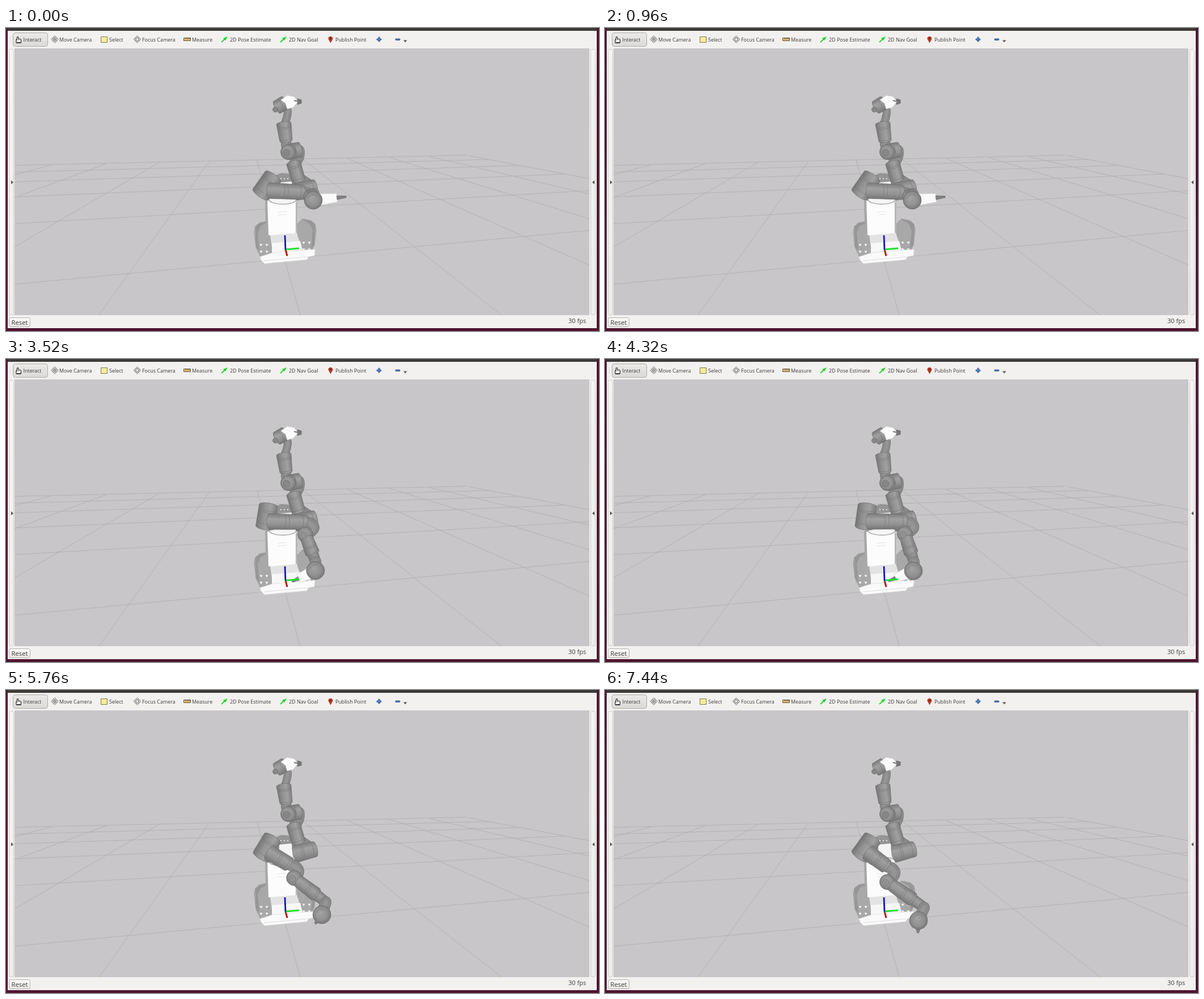
These frames come from a looping animation (1046x535 px, 8 s). An HTML page with a canvas:

```html
<!DOCTYPE html>
<html lang="en">
<head>
<meta charset="utf-8">
<title>Robot viewer</title>
<style>
html, body { margin: 0; width: 100%; height: 100%; overflow: hidden; background: #f2f1f0; }
canvas { display: block; }
</style>
</head>
<body>
<canvas id="stage" width="1046" height="535"></canvas>
<script>
const c = document.getElementById('stage').getContext('2d');
const FONT = '"Open Sans", "Noto Sans", sans-serif';
const LOOP = 8000;
const EDGE = '#717071';

// ---------- drawing helpers ----------
const lerp = (a, b, t) => a + (b - a) * t;
const between = (p, q, t) => [lerp(p[0], q[0], t), lerp(p[1], q[1], t)];

function rect(x, y, w, h, fill) {
  c.fillStyle = fill;
  c.fillRect(x, y, w, h);
}

function paint(fill, edge, width = 0.8) {
  if (fill) {
    c.fillStyle = fill;
    c.fill();
  }
  if (edge) {
    c.strokeStyle = edge;
    c.lineWidth = width;
    c.stroke();
  }
}

function poly(pts, fill, edge) {
  c.beginPath();
  for (let i = 0; i < pts.length; i += 2) c.lineTo(pts[i], pts[i + 1]);
  c.closePath();
  paint(fill, edge);
}

function line(x1, y1, x2, y2, color, width = 1) {
  c.beginPath();
  c.moveTo(x1, y1);
  c.lineTo(x2, y2);
  paint(null, color, width);
}

function disc(x, y, r, fill, edge) {
  c.beginPath();
  c.arc(x, y, r, 0, 7);
  paint(fill, edge);
}

function box(x, y, w, h, r, top, bottom, edge) {
  const g = c.createLinearGradient(0, y, 0, y + h);
  g.addColorStop(0, top);
  g.addColorStop(1, bottom);
  c.beginPath();
  c.roundRect(x + 0.5, y + 0.5, w - 1, h - 1, r);
  paint(g, edge, 1);
}

function text(str, x, y, size) {
  c.font = size + 'px ' + FONT;
  c.fillStyle = '#3c3c3c';
  c.fillText(str, x, y);
}

// Shaded cylinder from p to q, with seams at the given fractions.
function tube(p, r1, q, r2, seams = [0.14, 0.86]) {
  const dx = q[0] - p[0], dy = q[1] - p[1], len = Math.hypot(dx, dy);
  const r = Math.max(r1, r2), bulge = 0.3;
  c.save();
  c.translate(...p);
  c.rotate(Math.atan2(dy, dx));
  const g = c.createLinearGradient(0, -r, 0, r);
  g.addColorStop(0, '#7c7b7c');
  g.addColorStop(0.35, '#a1a0a1');
  g.addColorStop(0.65, '#949394');
  g.addColorStop(1, '#767576');
  c.beginPath();
  c.ellipse(0, 0, r1 * bulge, r1, 0, Math.PI / 2, Math.PI * 1.5);
  c.ellipse(len, 0, r2 * bulge, r2, 0, -Math.PI / 2, Math.PI / 2);
  c.closePath();
  paint(g, EDGE, 0.7);
  for (const s of seams) {
    const k = lerp(r1, r2, s);
    c.beginPath();
    c.ellipse(len * s, 0, k * bulge, k, 0, -Math.PI / 2, Math.PI / 2);
    paint(null, '#7a797a', 0.7);
  }
  c.restore();
}

function ball(p, r) {
  const g = c.createRadialGradient(p[0] - r * 0.2, p[1] - r * 0.25, 1, p[0], p[1], r * 1.1);
  g.addColorStop(0, '#a3a2a3');
  g.addColorStop(0.6, '#929192');
  g.addColorStop(1, '#737273');
  disc(...p, r, g, EDGE);
}

// Curved connector that bows through a control point.
function strap(p, bow, q, width) {
  c.lineCap = 'round';
  for (const [color, w] of [[EDGE, width], ['#8b8a8b', width - 1.4], ['#969596', width * 0.4]]) {
    c.beginPath();
    c.moveTo(...p);
    c.quadraticCurveTo(...bow, ...q);
    paint(null, color, w);
  }
  c.lineCap = 'butt';
}

function taper(p, r1, q, r2, fill, edge) {
  const a = Math.atan2(q[1] - p[1], q[0] - p[0]) + Math.PI / 2;
  const u = Math.cos(a), v = Math.sin(a);
  poly([p[0] + u * r1, p[1] + v * r1, q[0] + u * r2, q[1] + v * r2,
        q[0] - u * r2, q[1] - v * r2, p[0] - u * r1, p[1] - v * r1], fill, edge);
}

// ---------- window ----------
function drawWindow() {
  rect(0, 0, 1046, 535, '#4f1430');
  rect(3, 0, 1039, 5, '#3d3b37');
  rect(3, 5, 1039, 525, '#f2f1f0');
  rect(15, 36, 1014, 471, '#c8c6c8');
  for (const x of [5, 1031]) box(x, 37, 9, 470, 3, '#f5f4f3', '#eeedeb', '#cfccc9');
  poly([9, 269, 13, 272.5, 9, 276], '#565450');
  poly([1038, 269, 1034, 272.5, 1038, 276], '#565450');
  box(5, 511, 38, 17, 3, '#fbfbfa', '#e9e7e5', '#b4b0ab');
  text('Reset', 9.5, 524, 11.3);
  text('30 fps', 992, 521, 11);
}

// ---------- toolbar ----------
function hand(x) {
  c.beginPath();
  c.roundRect(x + 1, 19.5, 8.5, 7, 2);
  c.roundRect(x + 2.5, 15.5, 2.4, 6, 1);
  paint('#fff', '#222', 1.2);
  rect(x + 2.8, 19, 1.8, 5, '#fff');
  rect(x + 2.5, 25, 6, 1.8, '#333');
}

function cross(x, hub) {
  for (let i = 0; i < 4; i++) {
    c.save();
    c.translate(x + 6.5, 20);
    c.rotate(i * Math.PI / 2);
    poly([0, -6.5, 3, -3.5, 1, -3.5, 1, -1, -1, -1, -1, -3.5, -3, -3.5], '#dad9d7', '#777674');
    c.restore();
  }
  disc(x + 6.5, 20, hub, '#e9e8e6', '#777');
}

function marquee(x) {
  rect(x, 15, 12, 11, '#f6eb9c');
  c.setLineDash([2, 1]);
  c.strokeStyle = '#44422f';
  c.lineWidth = 1;
  c.strokeRect(x + 0.5, 15.5, 11, 10);
  c.setLineDash([]);
}

function ruler(x) {
  box(x, 17, 13, 6, 0, '#e6cc94', '#c9a867', '#6e5a3a');
  for (let i = 3; i < 12; i += 2) rect(x + i, 17, 0.8, 2.5, '#54452c');
}

function arrow(x) {
  line(x, 25, x + 7, 18.5, '#22d52a', 1.8);
  poly([x + 3, 18, x + 11, 15, x + 7, 22], '#22d52a');
}

function pin(x) {
  c.beginPath();
  c.arc(x + 4, 18.7, 3.9, Math.PI * 0.9, Math.PI * 2.1);
  c.lineTo(x + 4, 26.5);
  paint('#b93a24');
  disc(x + 4, 18.5, 1.4, '#6d1c14');
}

const tools = [
  ['Interact', 17, 30.5, hand],
  ['Move Camera', 79.5, 94, x => cross(x, 1.2)],
  ['Select', 167, 182, marquee],
  ['Focus Camera', 225, 240, x => cross(x, 2.6)],
  ['Measure', 313, 328, ruler],
  ['2D Pose Estimate', 380, 395, arrow],
  ['2D Nav Goal', 484, 499, arrow],
  ['Publish Point', 568.5, 581, pin]
];

function drawToolbar() {
  box(12, 8, 62, 25, 4, '#ebeae8', '#dcdad8', '#aeaaa6');
  for (let y = 15; y < 27; y += 3) rect(7, y, 1, 1, '#c3c0bc');
  for (const [label, iconX, x, icon] of tools) {
    icon(iconX);
    text(label, x, 23.8, 8.95);
  }
  const blue = ['#6b94c9', '#3d6ba8', '#31598f'];
  for (const x of [653.5, 686.5]) box(x, 18.5, 9, 3.4, 0.8, ...blue);
  box(656.4, 15.5, 3.4, 9, 0.8, ...blue);
  rect(655, 19.2, 6.4, 2, '#5582bb');
  poly([701, 21.5, 707.5, 21.5, 704.2, 25.5], '#5d5b58');
}

// ---------- ground grid in perspective ----------
function drawGrid() {
  const color = '#b2b0b2';
  const farX = n => (443 + 92.5 * n) / (1 + 0.0222 * n);
  const farY = x => 243 - 0.0222 * (x - 16);
  const nearX = n => 519 + 355 * n;
  c.save();
  c.beginPath();
  c.rect(15, 37, 1014, 470);
  c.clip();
  for (let n = -4; n <= 5; n++) line(farX(n), farY(farX(n)), nearX(n), 507, color, 0.9);

  // Rows share a vanishing point and stop at the right border.
  const x5 = farX(5), y5 = farY(x5), border = (507 - y5) / (nearX(5) - x5);
  for (let n = 0; n <= 5; n++) {
    const y = 176 + 438 / (1.585 + n), slope = (176 - y) / 2944;
    const end = (y - 16 * slope - y5 + border * x5) / (border - slope);
    line(16, y, end, y + slope * (end - 16), color, 0.9);
  }
  c.restore();
}

// ---------- robot ----------
function drawFender() {
  poly([438, 360, 440, 350, 447, 344, 462, 341, 471, 350, 469, 398, 449, 404, 441, 387], '#a9a8a9', '#949394');
  poly([440, 351, 447, 345, 463, 342, 449, 350, 444, 362, 447, 395, 441, 386], '#979697');
  for (const x of [450, 460]) {
    for (const y of [383, 395]) poly([x - 2.5, y - 1.5, x + 2.5, y - 1.5, x, y + 2.5], '#fff');
  }
}

function drawBase() {
  poly([470, 268, 477, 260, 486, 257, 499, 258, 506, 272, 500, 304, 468, 300], '#969596', '#807f80');
  poly([482, 273, 504, 271, 506, 300, 482, 302], '#f4f4f4');
  for (let x = 484; x < 500; x += 6) rect(x, 265, 1.8, 2, '#e8e8e8');
  drawFender();
  c.save();
  c.translate(985, -4);
  c.scale(-1, 1);
  drawFender();
  c.restore();
  poly([457, 304, 463, 302, 465, 365, 458, 345], '#a7a6a7');
  poly([461, 305, 512, 304, 511, 366, 463, 366], '#fcfcfc');
  poly([511, 308, 514, 306, 513, 360, 511, 364], '#b5b4b5');
  c.beginPath();
  c.ellipse(488, 303, 24, 8, 0, 0, 7);
  paint('#f5f5f5', '#a5a4a5', 1.5);
  for (let i = 0; i < 2; i++) line(479 + i, 325 + i * 5, 495, 324 + i * 5, '#e6e6e6');
  poly([466, 366, 513, 362, 520, 384, 469, 387], '#e4e3e4');
  poly([469, 380, 519, 376, 524, 397, 469, 402], '#f7f7f7');
  poly([448, 404, 470, 397, 526, 392, 545, 391, 544, 402, 533, 404, 531, 409, 456, 416, 450, 410], '#fafafa', '#e0dfe0');
  line(455, 411, 531, 404, '#d6d5d6', 0.8);
}

function drawRaisedArm() {
  strap([514, 264], [522, 270], [538, 280], 21);
  tube([511, 289], 15.5, [545, 281], 13.5, [0.2, 0.3, 0.8]);
  strap([517, 216], [519, 230], [508, 240], 19);
  tube([507, 238], 12.5, [516, 269], 12, [0.1, 0.2, 0.85]);
  strap([495, 197], [492, 206], [497, 214], 18);
  tube([498, 219], 14, [518, 215], 13.5, [0.5]);
  ball([498, 219], 13.5);
  disc(495, 220, 6, '#888788', EDGE);
  strap([497, 146], [497, 156], [492, 168], 14);
  tube([490, 169], 13, [494, 199], 11, [0.1, 0.2, 0.88]);
  tube([478, 140], 12, [492, 132], 12.5, [0.4]);
  disc(475, 144, 4.5, '#888788', EDGE);
  taper([514, 130], 5, [521, 130], 3, '#777677', '#666');
  poly([485, 127, 496, 119, 508, 121, 515, 130, 507, 140, 496, 143, 493, 133], '#fbfbfb', '#d0cfd0');
  line(508, 128, 516, 130, '#777677', 2);
}

// Key poses of the moving arm: barrel tilt in degrees, then joint positions.
const rest = { tilt: 125, hub: [524, 290], elbow: [538, 298], knuckle: [543, 293], wrist: [542, 304], tip: [600, 298] };
const reach = { tilt: 118, hub: [505, 305], elbow: [513, 327], knuckle: [564, 351], wrist: [575, 364], tip: [578, 409] };
const tuck = { tilt: 98, hub: [530, 287], elbow: [529, 309], knuckle: [545, 358], wrist: [544, 374], tip: [500, 392] };
const curl = { tilt: 118, hub: [500, 305], elbow: [515, 327], knuckle: [565, 368], wrist: [560, 390], tip: [541, 402] };
const drop = { tilt: 126, hub: [496, 311], elbow: [498, 339], knuckle: [563, 384], wrist: [553, 407], tip: [552, 429] };

function mix(a, b, t) {
  const out = {};
  for (const k in a) out[k] = k === 'tilt' ? lerp(a[k], b[k], t) : between(a[k], b[k], t);
  return out;
}

// The view refreshes in hard steps: start time and pose.
const steps = [
  [0, rest],
  [2800, reach],
  [3520, mix(reach, tuck, 0.94)],
  [4320, tuck],
  [4640, mix(tuck, reach, 0.85)],
  [5200, curl],
  [5760, mix(curl, drop, 0.4)],
  [6320, mix(curl, drop, 0.8)],
  [7120, mix(curl, drop, 0.9)],
  [7440, drop]
];

function drawMovingArm({ tilt, hub, elbow, knuckle, wrist, tip }) {
  const a = tilt * Math.PI / 180, ux = 19 * Math.cos(a), uy = 19 * Math.sin(a);
  strap(hub, [hub[0] + 28, hub[1] + 8], elbow, 21);
  tube([460 - ux, 278 - uy], 16.5, [460 + ux, 278 + uy], 16.5, [0.12, 0.2, 0.75]);
  tube([464, 287], 14, hub, 13, [0.4, 0.5, 0.88]);

  const palm = between(wrist, tip, 0.72), cuff = between(elbow, knuckle, 0.68);
  taper(wrist, 11, palm, 7.5, '#fafafa', '#d4d3d4');
  taper(palm, 3.4, tip, 1.4, '#828182', '#717071');
  tube(cuff, 10, knuckle, 9, []);
  strap(knuckle, between(knuckle, wrist, 0.5), wrist, 20);
  ball(elbow, 13.5);
  tube(between(elbow, cuff, 0.2), 11, cuff, 12.5, [0.45, 0.55, 0.9]);
  disc(elbow[0] - 3, elbow[1] + 1, 6, '#929192', '#7d7c7d');
  ball(wrist, 16);
  c.beginPath();
  c.arc(...wrist, 10, 3.4, 5.6);
  paint(null, '#7a797a');
}

function drawAxes() {
  line(493, 391, 496, 402.5, '#b41c12', 3);
  line(493, 391, 517, 389, '#1fe02c', 2.8);
  line(493, 391.5, 492, 366, '#1414c8', 2.8);
}

function draw(t) {
  drawWindow();
  drawToolbar();
  drawGrid();
  drawBase();
  drawRaisedArm();
  drawMovingArm(steps.findLast(s => s[0] <= t)[1]);
  drawAxes();
}

const start = performance.now();
function tick() {
  draw((performance.now() - start) % LOOP);
  requestAnimationFrame(tick);
}
tick();
</script>
</body>
</html>
```
